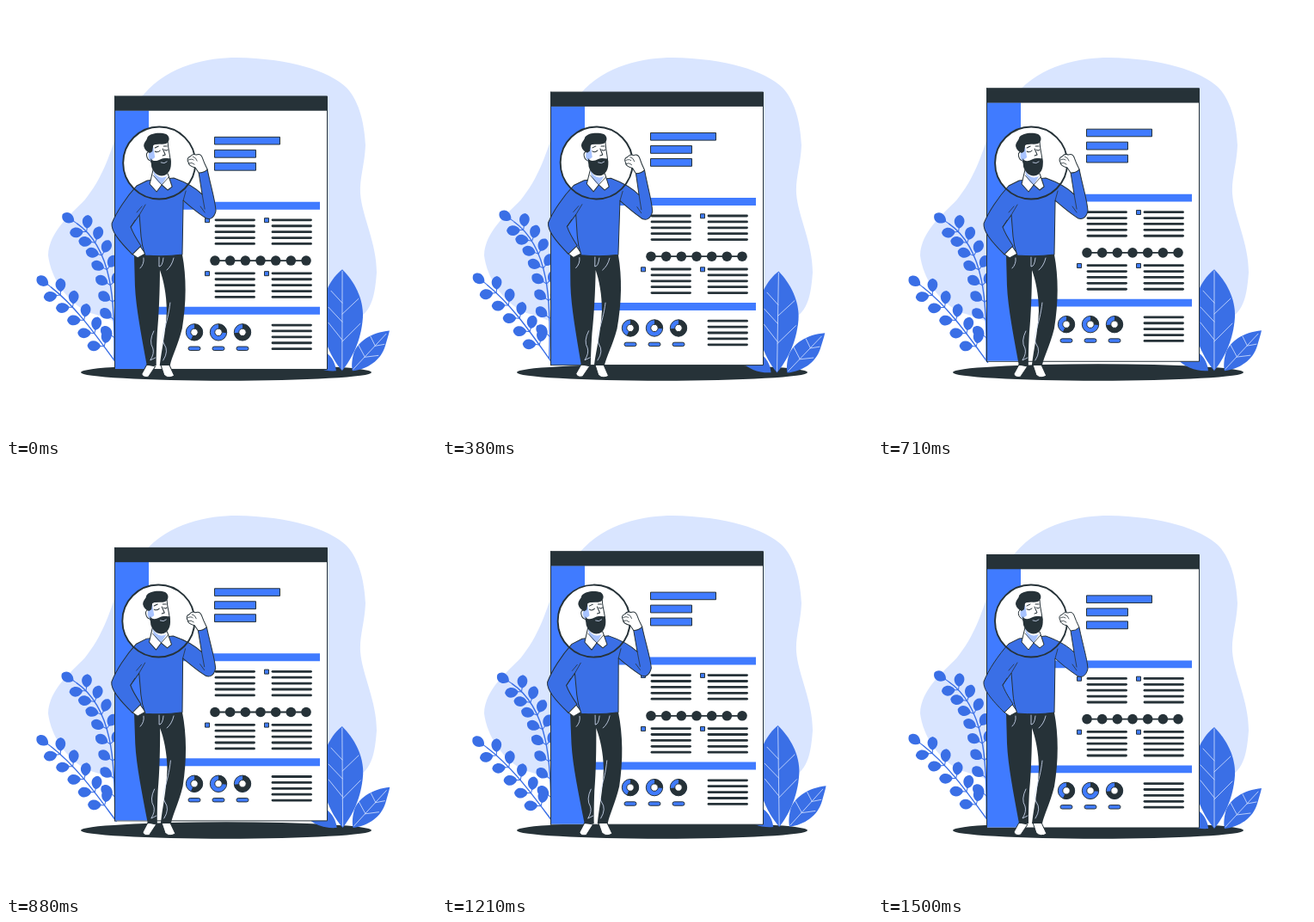
An HTML page that plays this animation: 500 px wide and 500 px high, repeating every 1540 ms.

```html
<!DOCTYPE html>
<html lang="en">
<head>
<meta charset="utf-8">
<title>Profile page</title>
<style>
  html, body { margin: 0; width: 100%; height: 100%; overflow: hidden; background: #fff; }
  svg { display: block; width: 100vw; height: 100vh; }
  .ink { fill: #263238; }
  .blue { fill: #407bff; }
  .deep { fill: #3a6fe6; }
  .white { fill: #fff; }
  .shade { fill: #a8c3ff; }
  .edge { stroke: #263238; stroke-width: 1; stroke-linejoin: round; }
  .line { fill: none; stroke: #263238; stroke-linecap: round; stroke-linejoin: round; }
  .vein { fill: none; stroke: #d9e5ff; stroke-width: .8; stroke-linecap: round; }
  .stem { fill: none; stroke: #3a6fe6; stroke-width: 1.4; }
</style>
</head>
<body>
<svg viewBox="0 0 500 500">
  <path fill="#d9e5ff" d="M160 103C190 68 235 60 268 60C330 61 375 75 396 95C412 112 417 140 418 162C417 185 411 200 412 218C414 245 431 275 431 310C429 335 426 355 408 364C390 374 340 385 300 385L160 378C130 370 115 361 98 357C70 345 52 315 49 290C50 262 75 243 92 225C112 200 120 175 130 145C138 125 150 112 160 103Z"/>
  <ellipse class="ink" cx="256" cy="426" rx="169" ry="9.7"/>

  <g id="plants">
    <g id="sprigs"></g>
    <path class="deep" d="M384 424C383 412 375 400 360 398C350 398 345 405 350 412C357 420 370 425 384 424Z"/>
    <path class="deep" d="M391 306C405 320 416 340 415 362C413 390 402 410 391 424C375 405 366 380 367 355C368 335 378 316 391 306Z"/>
    <path class="deep" d="M446 377C425 379 408 390 404 405C402 413 402 420 403 424C420 422 436 412 441 395C443 388 445 382 446 377Z"/>
    <path class="vein" d="M391 308V422M391 358L410 340M391 345L378 331M391 367L375 350M391 390L412 369M391 388L375 368M442 381L404 422M429 394L424 384M429 395L440 393M417 407L410 394M417 408L433 406"/>
  </g>

  <g id="page">
    <rect class="white edge" x="126.5" y="105.5" width="247" height="317.5"/>
    <rect class="blue" x="127" y="122" width="39" height="300.5"/>
    <rect class="ink" x="126.5" y="105.5" width="247" height="16.8"/>
    <path class="edge" d="M126.5 105V423.5"/>
    <path class="blue" d="M176 228.4H365V237.3H176ZM176 350.4H365V359.3H176Z"/>
  </g>

  <g id="man">
    <circle class="white" cx="178" cy="182.5" r="42"/>
    <path class="white edge" d="M164 417L158 428Q160 433 166 431L174 419ZM180 417L184 429Q189 434 196 430L190 417Z"/>
    <path class="ink" d="M149 289H205C210 315 210 345 205 375C200 395 193 408 191 418H179C181 400 186 380 187 355C187 335 183 318 179 307C179 330 178 360 176 380C175 400 175 410 175 418H164C158 385 151 350 150 325Z"/>
    <path class="vein" d="M178 292V303Q182 303 183 293M195 293Q193 302 187 307M160 293Q161 300 156 305M172 378Q166 390 171 398Q173 404 168 412L174 409M191 345C188 372 179 384 184 393Q190 401 183 412"/>
    <path class="white edge" d="M146 288L155 278L162 288L153 293Z"/>
    <path class="deep edge" d="M164 203L152 209C140 222 128 240 123 253C122 262 132 274 147 289L157 279C151 270 147 263 145 257L155 243L157 268C158 280 161 287 162 290Q185 292 205 289L206 226C214 233 221 239 230 245C236 250 242 247 244 238C243 225 238 210 234 190L224 194L228 219C222 213 212 206 195 200Z"/>
    <path class="line" stroke-width=".8" d="M155 243L162 231M152 240L158 233M145 257L150 249M206 226L209 215M228 219L231 236M226 233L231 240"/>
    <path class="white edge" d="M171 190L167 207L175 216L181 208L188 214L193 210L188 195Z"/>
    <path class="shade" d="M171 191Q177 203 187 198L181 208Q172 203 171 191Z"/>
    <path class="line" stroke-width=".8" d="M171 197L181 208L189 199"/>
    <path class="white edge" d="M165 162L188 158C188 166 191 174 191 182L172 188L168 180C163 179 162 171 165 170Z"/>
    <path class="shade" d="M166 164H171L173 176L168 180Q164 177 166 170Z"/>
    <path class="ink" d="M160 163C160 158 164 156 164 153C168 147 180 147 186 149C191 152 190 158 186 160C180 162 174 159 171 162L170 169L167 171C163 169 161 167 160 163Z"/>
    <path class="ink" d="M168 177C171 182 176 180 180 178C184 176 189 178 191 177C193 186 191 194 184 197C176 199 171 193 169 187Z"/>
    <path class="line" stroke-width="1" d="M173 169Q176 171 179 168M184 167Q186 169 188 167M182 166L185 173L182 174M173 165L177 163M183 163L187 163"/>
    <path class="vein" d="M180 182Q184 184 187 181"/>
    <circle class="line" stroke-width="1.9" cx="178" cy="182.5" r="42"/>
    <path class="white edge" d="M224 194L220 188Q212 186 212 182Q209 177 214 175Q217 171 221 173Q226 171 228 176Q230 182 234 190Q230 194 224 194Z"/>
    <path class="line" stroke-width=".8" d="M212 179Q216 177 218 179M212 183Q216 181 219 184M217 175Q221 176 222 180"/>
  </g>
</svg>
<script>
const get = id => document.getElementById(id);
const page = get("page"), plants = get("plants"), man = get("man"), sprigs = get("sprigs");

function add(parent, tag, attrs) {
  const el = document.createElementNS("http://www.w3.org/2000/svg", tag);
  for (const key in attrs) el.setAttribute(key, attrs[key]);
  return parent.appendChild(el);
}
const box = (x, y, width, height, rx = 0) =>
  add(page, "rect", { class: "blue edge", x, y, width, height, rx });

// Page contents
box(242.5, 152.9, 76, 8.6);
box(242.5, 167.9, 48, 8.8);
box(242.5, 182.9, 48, 8.8);
for (const [x, y] of [[243, 249.4], [309, 249.4], [243, 311.4], [309, 311.4], [309, 371.6]]) {
  for (let i = 0; i < 5; i++)
    add(page, "path", { class: "line", "stroke-width": 2.8, d: `M${x + 1} ${y + i * 6.9}h44.5` });
  if (y < 350) box(x < 300 ? 231.5 : 300.5, y - 2.2, 5, 5);
}
add(page, "path", { class: "line", "stroke-width": 1.8, d: "M243 296.6H349" });
for (let i = 0; i < 7; i++)
  add(page, "circle", { class: "ink", cx: 243 + i * 17.67, cy: 296.6, r: 5.8 });
[205, 95, 265].forEach((deg, i) => {
  const cx = 219 + i * 28, cy = 379.9, r = 9.7, a = deg * Math.PI / 180;
  add(page, "circle", { class: "blue edge", cx, cy, r });
  add(page, "path", { class: "ink", d: `M${cx} ${cy}v${-r}A${r} ${r} 0 ${+(deg > 180)} 1 ${cx + r * Math.sin(a)} ${cy - r * Math.cos(a)}Z` });
  add(page, "circle", { class: "white edge", cx, cy, r: 4.2 });
  box(cx - 7, 396.6, 14, 4.4, 2.2);
});

// A sprig is a cubic stem with paired teardrop leaves and one at the tip
function sprig(p, pairs, first, gap) {
  add(sprigs, "path", { class: "stem", d: `M${p[0]}C${p.slice(1).join(" ")}` });
  const at = (t, k) => {
    const u = 1 - t;
    return u * u * u * p[0][k] + 3 * u * u * t * p[1][k] + 3 * u * t * t * p[2][k] + t * t * t * p[3][k];
  };
  const leaf = (t, turn) => {
    const x = at(t, 0), y = at(t, 1), s = t - .01;
    const angle = Math.atan2(y - at(s, 1), x - at(s, 0)) * 180 / Math.PI + turn;
    add(sprigs, "path", {
      class: "deep",
      transform: `translate(${x} ${y}) rotate(${angle})`,
      d: "M0 -.5L4 -.5C7 -8 17 -9 19.5 -1C18 7 8 7 4 .5L0 .5Z"
    });
  };
  leaf(1, 0);
  for (let i = 0; i < pairs; i++) {
    leaf(first + i * gap, 52);
    leaf(first + i * gap, -48);
  }
}
sprig([[126, 412], [127, 345], [124, 282], [82, 253]], 8, .13, .11);
sprig([[128, 415], [108, 388], [84, 352], [52, 327]], 5, .22, .165);

// Float up and down by 10, sway by one degree, both linear, at 24 steps a second
function draw(now) {
  const step = Math.floor((now % 1540 + 4) * 24 / 1000);
  const p = (step + 1) / 37 % 1;
  const lift = 10 * (1 - Math.abs(1 - 2 * p));
  const sway = p < .25 ? 4 * p : p < .75 ? 2 - 4 * p : 4 * p - 4;
  page.setAttribute("transform", `translate(0 ${-lift})`);
  plants.setAttribute("transform", `rotate(${sway} 241 333)`);
  man.setAttribute("transform", `rotate(${sway} 183 286)`);
}
const start = performance.now();
function tick() {
  draw(performance.now() - start);
  requestAnimationFrame(tick);
}
tick();
</script>
</body>
</html>
```
